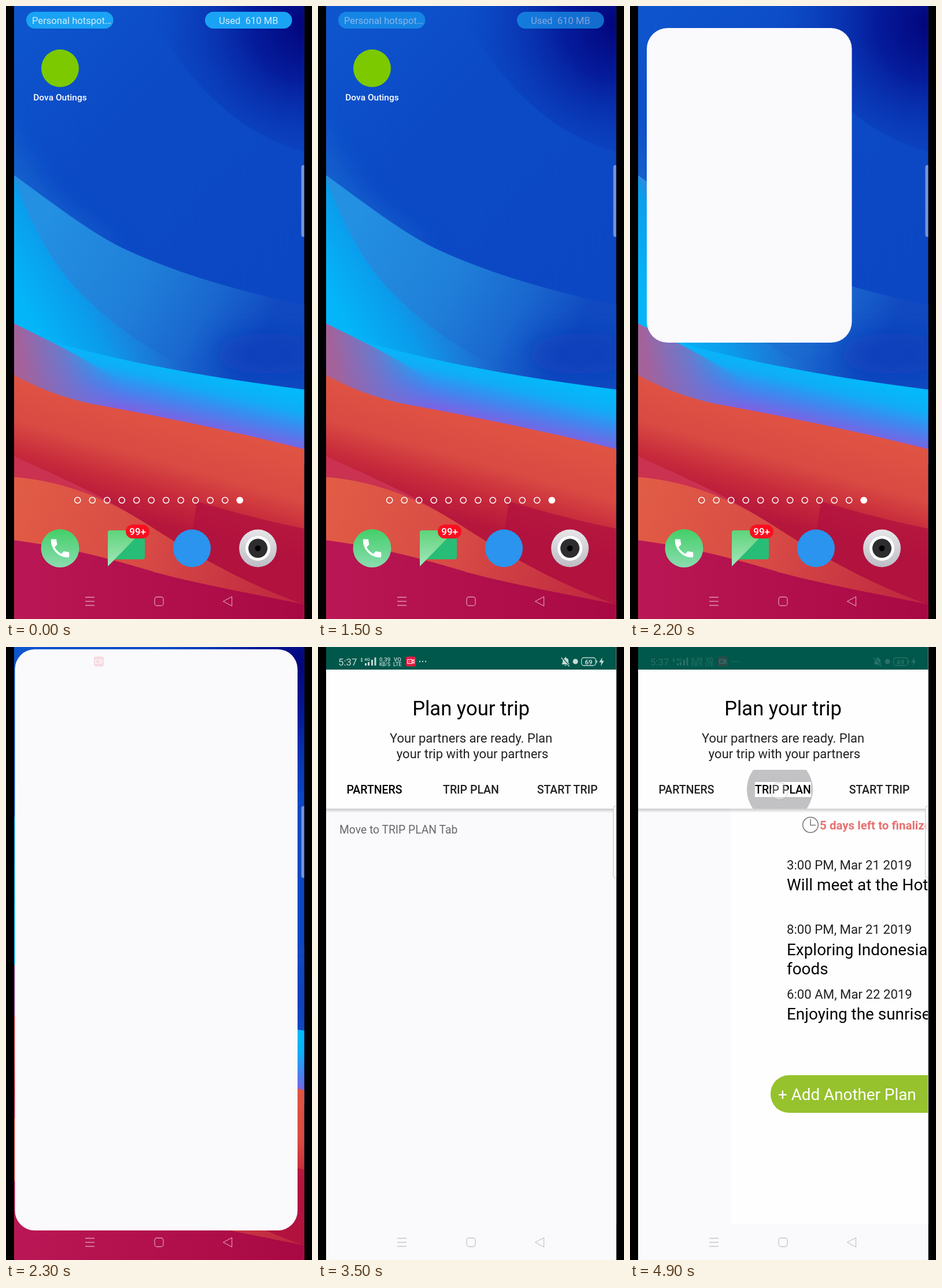
These frames come from a looping animation (529 by 1058 pixels, 5000 ms). An HTML page:

```html
<!DOCTYPE html>
<html lang="en">
<head>
<meta charset="utf-8">
<title>Phone demo</title>
<style>
html, body { margin: 0; width: 100%; height: 100%; overflow: hidden; background: #000; }
svg { display: block; width: 100%; height: 100%; }
text { font-family: Roboto, Arial, sans-serif; white-space: pre; }
.mid { text-anchor: middle; }
.med { font-weight: 500; }
</style>
</head>
<body>
<svg viewBox="0 0 529 1058" preserveAspectRatio="none">
<defs>
  <clipPath id="screen"><path d="M14 0H515.500V1058H14z"/></clipPath>
  <clipPath id="tabClip"><path d="M190 212H330V279H190z"/></clipPath>
  <clipPath id="pageClip"><path d="M14 279H515.500V996H14z"/></clipPath>
  <filter id="soft" x="-50%" y="-50%" width="200%" height="200%"><feGaussianBlur stdDeviation="22"/></filter>
  <linearGradient id="sky" x1="0" y1="0" x2=".5" y2="1">
    <stop offset="0" stop-color="#0e56ce"/><stop offset=".3" stop-color="#0c4ac5"/><stop offset="1" stop-color="#0c45c2"/>
  </linearGradient>
  <radialGradient id="night" gradientUnits="userSpaceOnUse" cx="520" cy="30" r="270">
    <stop offset="0" stop-color="#03047a"/><stop offset=".35" stop-color="#041696" stop-opacity=".9"/><stop offset="1" stop-color="#0a3cba" stop-opacity="0"/>
  </radialGradient>
  <linearGradient id="band" gradientUnits="userSpaceOnUse" x1="60" y1="380" x2="430" y2="590">
    <stop offset="0" stop-color="#2390e2"/><stop offset=".45" stop-color="#2080d9"/><stop offset=".75" stop-color="#1a68cf"/><stop offset="1" stop-color="#1049c0"/>
  </linearGradient>
  <linearGradient id="cyan" gradientUnits="userSpaceOnUse" x1="40" y1="530" x2="210" y2="440">
    <stop offset="0" stop-color="#04b5f8"/><stop offset=".45" stop-color="#0b9bec"/><stop offset="1" stop-color="#1b80da" stop-opacity="0"/>
  </linearGradient>
  <linearGradient id="stripe" gradientUnits="userSpaceOnUse" x1="400" y1="645" x2="378" y2="738">
    <stop offset="0" stop-color="#03b9fa"/><stop offset=".3" stop-color="#10adf7"/><stop offset=".65" stop-color="#4484ee"/><stop offset="1" stop-color="#8060e2"/>
  </linearGradient>
  <linearGradient id="mauve" gradientUnits="userSpaceOnUse" x1="30" y1="630" x2="190" y2="605">
    <stop offset="0" stop-color="#a4629b"/><stop offset=".45" stop-color="#7b70c4" stop-opacity=".85"/><stop offset="1" stop-color="#5b78e0" stop-opacity="0"/>
  </linearGradient>
  <linearGradient id="coral" gradientUnits="userSpaceOnUse" x1="280" y1="700" x2="228" y2="885">
    <stop offset="0" stop-color="#e05443"/><stop offset=".45" stop-color="#d94a43"/><stop offset=".72" stop-color="#c72a3b"/><stop offset="1" stop-color="#b5163c"/>
  </linearGradient>
  <linearGradient id="ember" gradientUnits="userSpaceOnUse" x1="14" y1="850" x2="515" y2="1010">
    <stop offset="0" stop-color="#e15c45"/><stop offset=".45" stop-color="#d84b45"/><stop offset="1" stop-color="#bd253f"/>
  </linearGradient>
  <linearGradient id="wine" x1="0" y1="0" x2="1" y2="0">
    <stop offset="0" stop-color="#b91755"/><stop offset="1" stop-color="#a90943"/>
  </linearGradient>
  <linearGradient id="call" x1="0" y1="0" x2="0" y2="1">
    <stop offset="0" stop-color="#43cf68"/><stop offset="1" stop-color="#8bdcb0"/>
  </linearGradient>
  <linearGradient id="fold" x1="0" y1="0" x2="0" y2="1">
    <stop offset="0" stop-color="#5ed47a"/><stop offset="1" stop-color="#a5e6bd"/>
  </linearGradient>
  <linearGradient id="steel" x1="0" y1="0" x2="0" y2="1">
    <stop offset="0" stop-color="#e6e6e9"/><stop offset="1" stop-color="#bdbdc4"/>
  </linearGradient>
  <linearGradient id="shade" x1="0" y1="0" x2="0" y2="1">
    <stop offset="0" stop-color="#000" stop-opacity=".2"/><stop offset="1" stop-color="#000" stop-opacity="0"/>
  </linearGradient>
</defs>
<rect width="529" height="1058"/>
<g clip-path="url(#screen)">
  <g id="home">
    <rect x="14" width="502" height="1058" fill="url(#sky)"/>
    <path d="M240 0Q350 205 516 253V0z" fill="url(#night)"/>
    <path d="M-20 150Q30 320 200 420L-20 420z" fill="#1a74d4" opacity=".5" filter="url(#soft)"/>
    <path d="M14 292C80 340 145 390 200 417C290 460 400 492 516 516V670H14z" fill="url(#band)"/>
    <ellipse cx="455" cy="600" rx="95" ry="35" fill="#0c3dba" opacity=".8" filter="url(#soft)"/>
    <path d="M14 296C45 385 85 455 140 506C190 555 250 595 340 640H14z" fill="url(#cyan)"/>
    <path d="M14 548L75 578C220 620 380 645 516 662V790H14z" fill="url(#stripe)"/>
    <path d="M14 548L75 578C140 610 190 645 250 670V720H14z" fill="url(#mauve)"/>
    <path d="M14 637C60 662 100 676 150 687C270 709 400 735 516 765V1058H14z" fill="url(#coral)"/>
    <path d="M330 855Q430 885 516 902V1058H300z" fill="#b0103f" opacity=".75"/>
    <path d="M14 777C85 810 160 840 235 890L240 960H14z" fill="#cb3150"/>
    <path d="M14 813C100 820 175 850 245 895C330 950 420 1000 516 1033V1058H14z" fill="url(#ember)"/>
    <path d="M14 922C110 935 185 955 260 978C330 997 430 1015 516 1033V1058H14z" fill="url(#wine)"/>
    <g id="pills">
      <rect x="35" y="10" width="150.500" height="29" rx="14.500" fill="#1aa3f4"/>
      <rect x="344" y="10" width="150.500" height="29" rx="14.500" fill="#1aa3f4"/>
      <g fill="#d2ecfd" font-size="16.600">
        <text x="45" y="31">Personal hotspot…</text>
        <text x="368" y="31">Used  610 MB</text>
      </g>
    </g>
    <circle cx="93.500" cy="107.500" r="32.500" fill="#7cc900"/>
    <circle id="press" cx="93.500" cy="107.500" r="32.500" fill="#06203c" opacity="0"/>
    <text class="mid med" x="93.500" y="163" font-size="15.500" fill="#fff">Dova Outings</text>
    <g id="dots" fill="none" stroke="#fff" stroke-width="1.500"></g>
    <circle cx="93.500" cy="936" r="33" fill="url(#call)"/>
    <path transform="translate(72.500 915) scale(1.750)" fill="#fff" d="M6.620 10.790c1.440 2.830 3.760 5.140 6.590 6.590l2.200-2.200c.27-.27.67-.36 1.020-.24 1.120.37 2.330.57 3.570.57.55 0 1 .45 1 1V20c0 .55-.45 1-1 1-9.390 0-17-7.610-17-17 0-.55.45-1 1-1h3.500c.55 0 1 .45 1 1 0 1.250.2 2.450.57 3.570.11.35.03.74-.25 1.020z"/>
    <path d="M180 905H236Q240 905 240 909V951Q240 955 236 955H188L176 967V909Q176 905 180 905z" fill="#28bd76"/>
    <path d="M180 905H237L176 967V909Q176 905 180 905z" fill="url(#fold)"/>
    <rect x="207" y="895" width="41" height="24" rx="12" fill="#f90f20"/>
    <text class="mid med" x="227.700" y="913" font-size="17" fill="#fff">99+</text>
    <circle cx="321.500" cy="936" r="32.500" fill="#2a94ee"/>
    <circle cx="435.500" cy="936" r="32.500" fill="url(#steel)"/>
    <circle cx="435.500" cy="936" r="21.500" fill="#fff"/>
    <circle cx="435.500" cy="936" r="16.500" fill="#2d2d30"/>
    <circle cx="435.500" cy="936" r="5" fill="#000"/>
  </g>
  <rect id="win" fill="#faf9fc"/>
  <g id="app">
    <rect x="14" width="502" height="1058" fill="#faf9fc"/>
    <g clip-path="url(#pageClip)">
      <text id="hint" x="37" y="322" font-size="19.300" fill="#69696b">Move to TRIP PLAN Tab</text>
      <g id="plan">
        <rect y="279" width="502" height="717" fill="#fefefe"/>
        <circle cx="138" cy="307" r="13.300" fill="none" stroke="#777" stroke-width="1.500"/>
        <path d="M138 297V307.500H147" fill="none" stroke="#777" stroke-width="1.500"/>
        <text x="154" y="315" font-size="20.500" font-weight="700" fill="#e87070">5 days left to finalize</text>
        <g font-size="22.200" fill="#222">
          <text x="97" y="384">3:00 PM, Mar 21 2019</text>
          <text x="97" y="495">8:00 PM, Mar 21 2019</text>
          <text x="97" y="607">6:00 AM, Mar 22 2019</text>
        </g>
        <g font-size="27.900" fill="#050505">
          <text x="97" y="420">Will meet at the Hotel</text>
          <text x="97" y="532">Exploring Indonesian</text>
          <text x="97" y="565">foods</text>
          <text x="97" y="643">Enjoying the sunrise</text>
        </g>
        <rect x="69" y="739" width="363" height="65" rx="32" fill="#96c22d"/>
        <text x="82" y="782" font-size="27.800" fill="#fff">+ Add Another Plan</text>
      </g>
    </g>
    <rect x="14" y="279" width="502" height="7" fill="url(#shade)"/>
    <rect x="14" y="39" width="502" height="240" fill="#fefefe"/>
    <rect x="14" width="502" height="39" fill="#00574b"/>
    <text class="mid" x="264.500" y="118" font-size="34.600">Plan your trip</text>
    <g class="mid" font-size="22" fill="#222">
      <text x="264.500" y="165">Your partners are ready. Plan</text>
      <text x="267" y="192">your trip with your partners</text>
    </g>
    <g id="ripple" clip-path="url(#tabClip)">
      <circle id="wave" cx="259" cy="246" fill="#c2c1c4"/>
      <path d="M216 233H313V259H216z" fill="#fefefe"/>
    </g>
    <g class="mid med" font-size="19.500">
      <text id="tab0" x="97.500" y="253">PARTNERS</text>
      <text id="tab1" x="264.500" y="253">TRIP PLAN</text>
      <text x="431" y="253" fill="#222">START TRIP</text>
    </g>
    <g id="status" fill="#c5dad6">
      <text x="35" y="32" font-size="16.800">5:37</text>
      <path id="data" d="M73.500 21.500L75.500 18.500L77.500 21.500zM73.500 23L75.500 26L77.500 23z"/>
      <text class="med" x="80" y="24" font-size="8">4G</text>
      <path d="M81 28h3v4h-3zM86 26h3v6h-3zM92 22h3v10h-3zM97.500 18h3v14h-3z"/>
      <g class="med">
        <text x="106" y="24.500" font-size="9.800">0.39</text>
        <text x="106" y="32.500" font-size="8.400">KB/S</text>
        <text x="131" y="24.500" font-size="9.600">VO</text>
        <text x="130" y="32.500" font-size="9">LTE</text>
      </g>
      <circle cx="176" cy="25" r="1.200"/><circle cx="181" cy="25" r="1.200"/><circle cx="186" cy="25" r="1.200"/>
      <path d="M421 30L423 27V23Q423 20 427 19V17.500H429V19Q433 20 433 23V27L435 30zM426 31H430Q428 34 426 31z"/>
      <path d="M421 18L435 33" stroke="#00574b" stroke-width="2.500"/>
      <path d="M420.500 18.500L434.500 33.500" stroke="#c5dad6" stroke-width="1.300"/>
      <circle cx="445" cy="25" r="4.500"/>
      <rect x="455.500" y="18.500" width="24.500" height="13.500" rx="4" fill="none" stroke="#c5dad6" stroke-width="1.300"/>
      <path d="M481 23h1.500v4.500H481z"/>
      <text class="mid" x="467.800" y="29.500" font-size="11.500" font-weight="700">69</text>
      <path d="M491.500 18L486 26.500H489.800L488.800 33L494.500 23.800H490.800z"/>
    </g>
  </g>
  <g id="rec">
    <rect x="152" y="16.500" width="17" height="17" rx="3.500" fill="#e01d42"/>
    <path d="M155 21.500H162.500V28.500H155zM162.500 24L166 22V28L162.500 26M157.500 25H160" fill="none" stroke="#fff" stroke-width="1.200"/>
  </g>
  <g id="nav" fill="none" stroke-width="1.300">
    <path d="M137 1020.500H153M137 1027.500H153M137 1034.500H153"/>
    <rect x="257" y="1020" width="15" height="15" rx="4"/>
    <path d="M375.500 1027.500L390.500 1019.500V1035.500z" stroke-linejoin="round"/>
  </g>
  <rect id="handle" x="510.500" y="274.500" width="12" height="124" rx="4"/>
  <circle id="touch" r="15" fill="#fff" stroke="#8a8a8a"/>
</g>
</svg>
<script>
const LOOP = 5000, STEP = 100;
const el = id => document.getElementById(id);
const set = (id, attrs) => {
  for (const k in attrs) el(id).setAttribute(k, attrs[k]);
};
const show = (id, on) => set(id, { visibility: on ? "visible" : "hidden" });

// Piecewise linear value through [time, value] keys.
function track(t, keys) {
  if (t <= keys[0][0]) return keys[0][1];
  for (let i = 1; i < keys.length; i++) {
    const [t0, a] = keys[i - 1], [t1, b] = keys[i];
    if (t <= t1) return a + (b - a) * (t - t0) / (t1 - t0);
  }
  return keys[keys.length - 1][1];
}

// Opening window: time, x, y, width, height, corner radius.
const opening = [
  [2000, 61, 75, 65, 65, 32],
  [2100, 50, 62, 165, 215, 35],
  [2200, 29, 38, 354.5, 543, 36],
  [2300, 15.5, 4, 488.5, 1003, 34],
  [2400, 14, 0, 502, 1058, 0]
];
const windowAt = (t, i) => track(t, opening.map(k => [k[0], k[i]]));

for (let i = 0; i < 12; i++) {
  const dot = document.createElementNS("http://www.w3.org/2000/svg", "circle");
  const attrs = { cx: 123.7 + i * 25.5, cy: 853, r: 5.1, fill: i === 11 ? "#fff" : "none" };
  for (const k in attrs) dot.setAttribute(k, attrs[k]);
  el("dots").append(dot);
}

function drawTouch(t) {
  const onIcon = t >= 1700 && t < 2000, onTab = t >= 4600;
  show("touch", onIcon || onTab);
  set("touch", onTab
    ? { cx: 258, cy: 249, "fill-opacity": .35, "stroke-opacity": .45 }
    : { cx: 103, cy: 107.5, "fill-opacity": .82, "stroke-opacity": .4 });
}

function draw(t) {
  const inApp = t >= 3400;
  show("home", t < 2400);
  set("pills", { opacity: track(t, [[1300, 1], [1800, .1], [1900, 0]]) });
  set("press", { opacity: track(t, [[1600, 0], [1700, .35], [1800, .5], [1900, .5], [2000, .25]]) });

  show("win", t >= 2100);
  set("win", {
    x: windowAt(t, 1), y: windowAt(t, 2), rx: windowAt(t, 5),
    width: windowAt(t, 3), height: windowAt(t, 4)
  });

  show("app", inApp);
  set("app", { opacity: t < 3500 ? .5 : 1 });

  const fade = track(t, [[4400, 1], [4900, .2]]);
  set("status", { opacity: fade });
  set("data", { opacity: t >= 3700 && t < 4000 ? 0 : 1 });
  show("rec", t >= 2300);
  set("rec", { opacity: fade * track(t, [[2200, 0], [2300, .14], [2700, 1]]) });

  const left = Math.max(0, 1 - Math.max(0, t - 4800) / 490) ** 5;
  const shift = 501 * left;
  set("plan", { transform: `translate(${14 + shift} 0)` });
  set("hint", { x: 37 - 501 + shift });

  const pressed = t >= 4700;
  show("ripple", pressed && inApp);
  set("wave", { r: track(t, [[4700, 24], [4900, 57]]) });
  set("tab0", { fill: t >= 4800 ? "#222" : "#000" });
  set("tab1", { fill: t >= 4800 ? "#000" : "#222" });

  set("nav", { stroke: inApp ? "#c6c5c9" : "#fff", "stroke-opacity": inApp ? 1 : .55 });
  set("handle", inApp
    ? { fill: "#fdfdfe", "fill-opacity": .8, stroke: "#c3c3c6" }
    : { fill: "#c9d8f4", "fill-opacity": .55, stroke: "none" });
  drawTouch(t);
}

const start = performance.now();
function tick(now) {
  const t = Math.max(0, now - start) % LOOP;
  draw(Math.floor(t / STEP) * STEP);
  requestAnimationFrame(tick);
}
draw(0);
requestAnimationFrame(tick);
</script>
</body>
</html>
```
